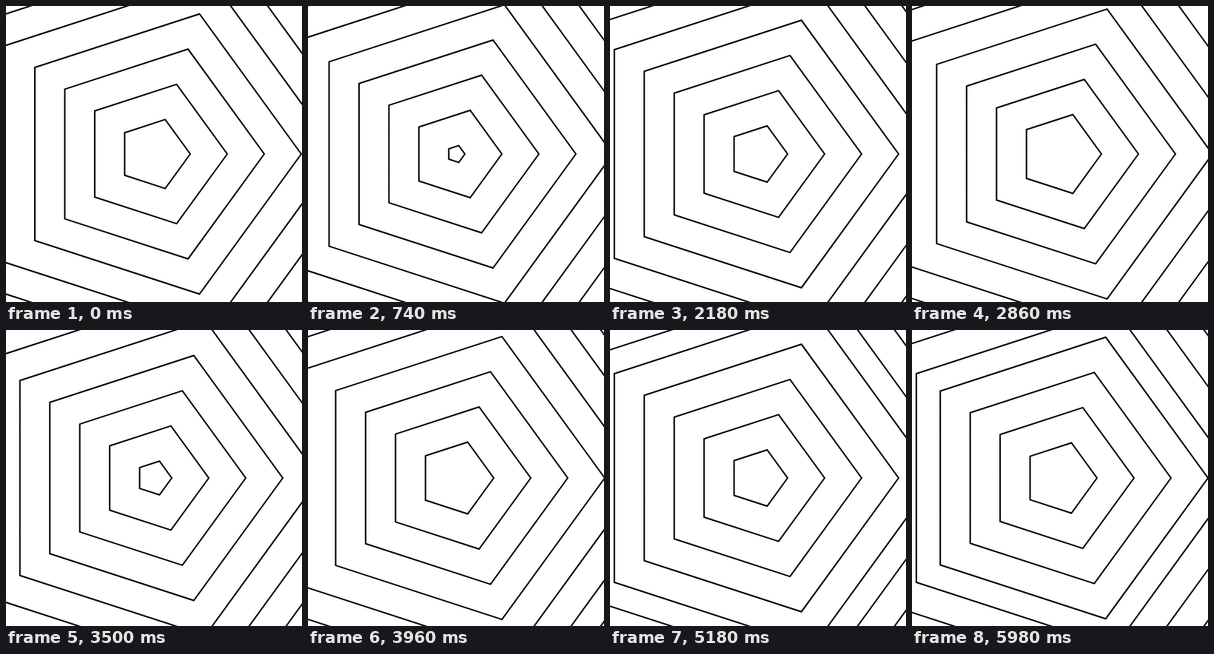
Animation of 400 by 400 pixels, one loop 6000 ms. Source, as an HTML page:

```html
<!DOCTYPE html>
<html lang="en">
<head>
<meta charset="utf-8">
<title>Shrinking pentagons</title>
<style>
  html, body { margin: 0; width: 100%; height: 100%; overflow: hidden; background: #fff; }
  svg { display: block; width: 100%; height: 100%; }
  path { fill: none; stroke: #000; stroke-width: 2; stroke-linejoin: miter; }
</style>
</head>
<body>
<svg viewBox="0 0 400 400"><path id="rings"/></svg>
<script>
const LOOP = 6000, STEP = 20;
const CENTER = 200, SIDES = 5, RINGS = 10, GAP = 50;
const MIN_RADIUS = 10, MAX_RADIUS = 500;
const path = document.getElementById('rings');

function pentagon(radius) {
  const points = Array.from({ length: SIDES }, (_, i) => {
    const angle = i * 2 * Math.PI / SIDES;
    const x = CENTER + radius * Math.cos(angle);
    const y = CENTER + radius * Math.sin(angle);
    return x.toFixed(3) + ' ' + y.toFixed(3);
  });
  return 'M' + points.join('L') + 'Z';
}

// Each ring shrinks 1px per step and restarts outside once it is small enough.
function ringRadius(index, step) {
  const radius = GAP * (index + 1) - 1 - step;
  return radius > MIN_RADIUS ? radius : radius + MAX_RADIUS - MIN_RADIUS;
}

function render(time) {
  const step = Math.floor((time % LOOP) / STEP);
  let d = '';
  for (let i = 0; i < RINGS; i++) d += pentagon(ringRadius(i, step));
  path.setAttribute('d', d);
}

function tick(now) {
  render(now);
  requestAnimationFrame(tick);
}

render(0);
requestAnimationFrame(tick);
</script>
</body>
</html>
```
